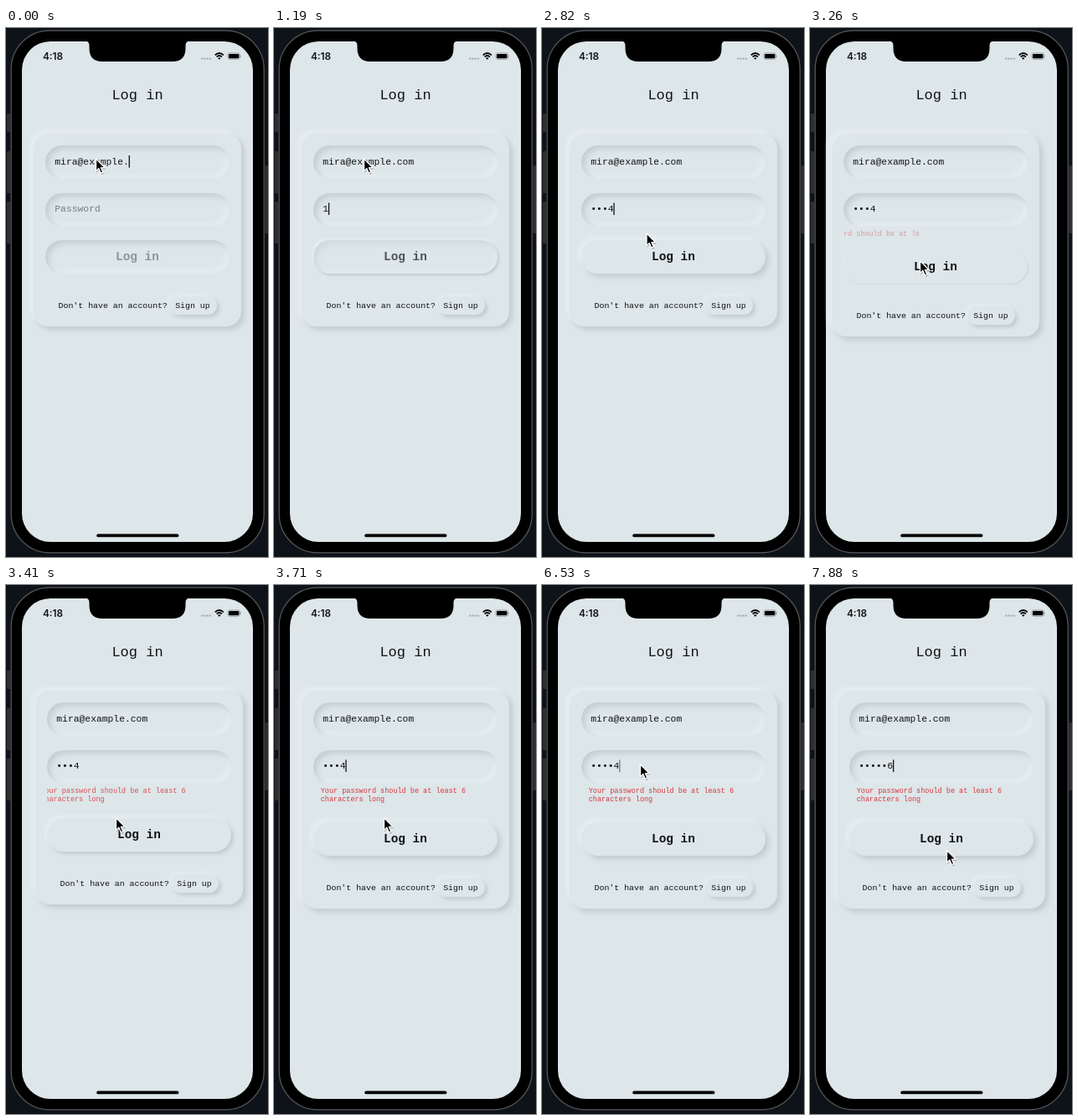
Write an HTML page that moves like this. It is 313x631 px and loops after 8000 ms.

```html
<!DOCTYPE html>
<html lang="en">
<head>
<meta charset="utf-8">
<title>Log in</title>
<style>
  html, body { margin: 0; width: 100%; height: 100%; overflow: hidden; background: #0e1219; }
  #stage { position: relative; width: 313px; height: 631px; overflow: hidden; }
  #stage > svg, #card, #card > * { position: absolute; left: 0; top: 0; }
  svg { width: 313px; height: 631px; overflow: hidden; }
  #card { width: 313px; height: 631px; }
  #card > div { box-sizing: border-box; background: #dde6e9; }
  .raised { box-shadow: -5px -5px 4px #e4ecef, 4px 4px 6px #c2cbcf; }
  .sunk { box-shadow: inset 4px 4px 6px #c5ced2, inset -5px -5px 4px #e4ecef; }
  #card > .panel { left: 33px; top: 126px; width: 248px; border-radius: 18px; }
  #card > .field { left: 47px; width: 220px; height: 40px; border-radius: 20px; }
  #card > .pill { left: 195px; width: 57px; height: 22px; border-radius: 11px;
    box-shadow: -3px -3px 4px #e4ecef, 3px 3px 4px #c2cbcf; }
  text { font-family: "Liberation Mono", "Courier New", monospace; fill: #101214; white-space: pre; }
  .entry { font-size: 11.35px; }
  .small { font-size: 9.9px; }
  .error { font-size: 8.5px; fill: #d9363c; }
</style>
</head>
<body>
<div id="stage">
  <svg viewBox="0 0 313 631">
    <g fill="#2e3033">
      <rect x="1" y="102" width="6" height="22" rx="1"/>
      <rect x="1" y="147" width="6" height="50" rx="1"/>
      <rect x="1" y="207" width="6" height="50" rx="1"/>
      <rect x="307" y="164" width="6" height="81" rx="1"/>
    </g>
    <rect x="5" y="2" width="304.5" height="625" rx="47" fill="#1b1c1e"/>
    <rect x="6.2" y="3.2" width="302" height="622.6" rx="46" stroke="#55575a" stroke-width="1.2"/>
    <rect x="19" y="16" width="276" height="597" rx="34" fill="#dde6e9"/>
    <path d="M95 15.5 Q99.5 16 99.5 21 V24 Q99.5 40 115 40 H199 Q214.5 40 214.5 24 V21 Q214.5 16 219 15.5 Z"/>
    <rect x="108.2" y="603.6" width="98.2" height="3.7" rx="1.85"/>
    <text x="44" y="38" style="font:600 11.8px Inter,sans-serif">4:18</text>
    <g fill="#a5adb1">
      <circle cx="234.3" cy="36.6" r="1.2"/><circle cx="237.5" cy="36.6" r="1.2"/>
      <circle cx="240.7" cy="36.6" r="1.2"/><circle cx="243.9" cy="36.6" r="1.2"/>
    </g>
    <g fill="none" stroke="#000" stroke-width="1.7">
      <path d="M249.7 32.4 Q254.8 27.6 259.9 32.4"/>
      <path d="M251.6 34.5 Q254.8 31.5 258 34.5"/>
    </g>
    <path d="M253 35.9 Q254.8 34.4 256.6 35.9 L254.8 37.8 Z"/>
    <rect x="264.9" y="29.9" width="14.6" height="7.4" rx="2.3" fill="none" stroke="#8d9497" stroke-width=".8"/>
    <rect x="266" y="31" width="12.4" height="5.2" rx="1.3"/>
    <path d="M280.3 32.2 Q282 33.6 280.3 35 Z" fill="#8d9497"/>
    <text x="157" y="85" font-size="17" text-anchor="middle">Log in</text>
  </svg>

  <div id="card">
    <div id="panel" class="panel raised"></div>
    <div class="field sunk" style="top:140px"></div>
    <div class="field sunk" style="top:196.5px"></div>
    <div id="button" class="field"></div>
    <div id="buttonOff" class="field sunk"></div>
    <div id="pill" class="pill"></div>
    <svg viewBox="0 0 313 631">
      <clipPath id="reveal"><rect id="revealBox" x="47" y="237" height="30"/></clipPath>
      <text id="email" class="entry" x="58.3" y="162.7"></text>
      <text id="password" class="entry" x="58.3" y="219"></text>
      <rect id="caret" width="1.3" height="14.5" fill="#111"/>
      <g clip-path="url(#reveal)">
        <g id="error">
          <text class="error" x="55.7" y="248.3">Your password should be at least 6</text>
          <text class="error" x="55.7" y="257.6">characters long</text>
        </g>
      </g>
      <g id="lower">
        <text x="157" y="277" id="label" font-size="14.4" font-weight="700" text-anchor="middle">Log in</text>
        <text class="small" x="62.6" y="334">Don't have an account?</text>
        <text class="small" x="202.2" y="334">Sign up</text>
      </g>
    </svg>
  </div>

  <svg viewBox="0 0 313 631">
    <g id="cursor" stroke-linejoin="round">
      <path d="M.5 1.5 V16.5 L4 13.3 L6.6 19 L9.4 17.9 L7 12.4 H12 Z" opacity=".25"/>
      <path d="M0 0 V14.6 L3.3 11.5 L5.8 17.2 L8.3 16.2 L5.9 10.6 H10.5 Z" stroke="#fff" stroke-width="1.3"/>
    </g>
  </svg>
</div>

<script>
const LOOP = 8000, STEP = 148.5, LEAD = 14;   // the screen refreshes once per STEP ms
const CHAR = 6.81, TEXT_X = 58.3;
const ERROR_W = 220, ERROR_H = 29.5;
const EMAIL = 'mira@example.com';
const $ = id => document.getElementById(id);

// All times below are counted in steps.
const typed = [
  [0, ''], [8, '1'], [10, '•2'], [12, '••3'], [15, '•••4'], [28, '••••'],
  [36, '••••4'], [45, '••••'], [47, '••••5'], [50, '•••••6']
];
const pointer = [
  [17, 107.5, 156], [18, 112, 176], [19, 125, 245], [20, 131.5, 277.8],
  [25, 131.5, 277.8], [26, 130, 268], [28, 120, 226], [30, 117.5, 214],
  [49, 117.5, 214], [50, 123, 229], [52, 157, 302], [53, 163.5, 316.5]
];
const blink = [
  [20, 1], [21, 0], [23, 0], [24, 1], [27, 1], [28, 0], [29, 0], [31, 1],
  [32, 1], [34, 0], [35, 0], [36, 1], [40, 1], [42, 0], [43, 0], [45, 1]
];
const enable = [[7, 0], [8, .5], [9, .9], [10, 1]];
const lift = [[20, 1], [21, .15], [22, .15], [23, .7], [24, 1]];
const expand = [[21, 0], [22, .41], [23, .85], [24, 1]];
const shake = [[21, 0], [22, -7], [23, 2], [24, 0]];

// Linear interpolation through [time, ...values] keys.
function track(keys, s) {
  if (s <= keys[0][0]) return keys[0].slice(1);
  for (let i = 1; i < keys.length; i++) {
    const a = keys[i - 1], b = keys[i];
    if (s <= b[0]) {
      const k = (s - a[0]) / (b[0] - a[0]);
      return a.slice(1).map((v, j) => v + (b[j + 1] - v) * k);
    }
  }
  return keys[keys.length - 1].slice(1);
}
const value = (keys, s) => track(keys, s)[0];
const move = (id, x, y) => $(id).setAttribute('transform', `translate(${x} ${y})`);

function drawEntries(s) {
  const onEmail = s < 5;
  const email = EMAIL.slice(0, 13 + s);
  const secret = typed.filter(k => k[0] <= s).pop()[1];
  const empty = secret === '';
  $('email').textContent = email;
  $('password').textContent = empty ? 'Password' : secret;
  $('password').style.fill = empty ? '#757d80' : '';
  const count = (onEmail ? email : secret).length;
  $('caret').setAttribute('x', TEXT_X + count * CHAR - .2);
  $('caret').setAttribute('y', onEmail ? 152 : 208.5);
  $('caret').setAttribute('opacity', value(blink, s));
}

function drawCard(s) {
  const open = value(expand, s), drop = open * ERROR_H;
  const on = value(enable, s), up = on * value(lift, s);
  $('card').style.transform = `translateX(${value(shake, s)}px)`;
  $('panel').style.height = 230 + drop + 'px';
  $('button').style.top = $('buttonOff').style.top = 253 + drop + 'px';
  $('buttonOff').style.opacity = 1 - on;
  $('button').style.boxShadow =
    `${-5 * up}px ${-5 * up}px ${4 * up}px #e4ecef, ${4 * up}px ${4 * up}px ${6 * up}px #c2cbcf`;
  $('pill').style.top = 320 + drop + 'px';
  $('label').setAttribute('opacity', .38 + .62 * on);
  move('lower', 0, drop);
  // The message stays centred in a box that grows from its left edge.
  move('error', ERROR_W * (open - 1) / 2, 0);
  $('error').setAttribute('opacity', open);
  $('revealBox').setAttribute('width', ERROR_W * open);
  $('revealBox').setAttribute('height', drop);
}

function draw(t) {
  const s = Math.floor((t % LOOP + LEAD) / STEP);
  drawEntries(s);
  drawCard(s);
  move('cursor', ...track(pointer, s));
}

let start = null;
function tick(now) {
  if (start === null) start = now;
  draw(now - start);
  requestAnimationFrame(tick);
}
draw(0);
requestAnimationFrame(tick);
</script>
</body>
</html>
```
